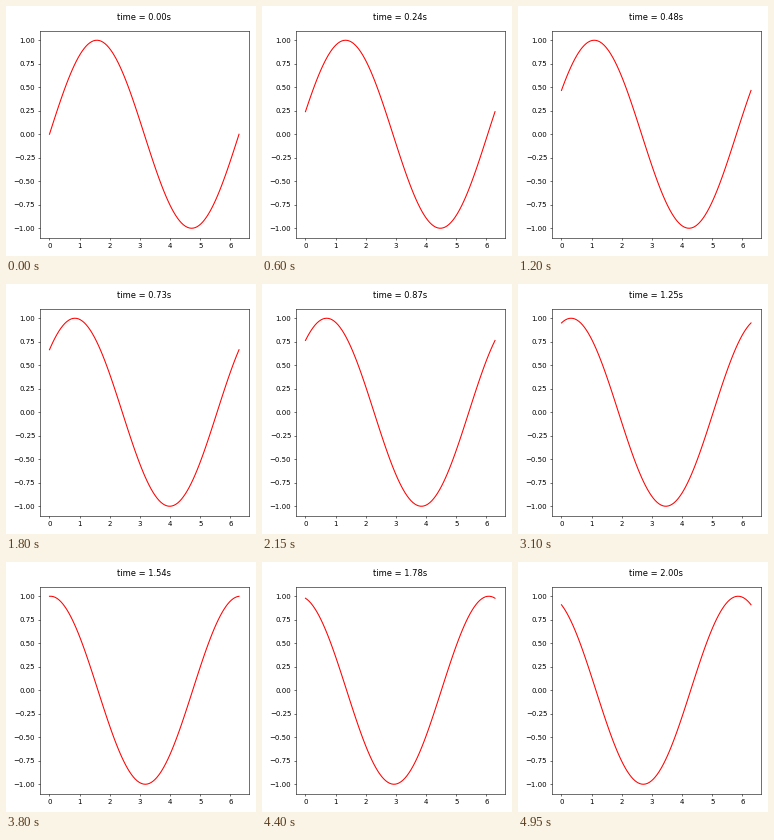
Animation, 250 px wide and 250 px high, one loop 5000 ms. Source, as a matplotlib script:

```python
import numpy as np
import matplotlib.pyplot as plt
from matplotlib.animation import FuncAnimation

FRAMES = 100
INTERVAL = 50  # ms

plt.rcParams["font.family"] = "DejaVu Sans"

x = np.linspace(0, 2 * np.pi, 100)
times = np.linspace(0, 2, FRAMES)

fig, ax = plt.subplots(figsize=(5, 5), dpi=50)
line, = ax.plot(x, np.sin(x), color="red")
title = ax.text(0.5, 1.05, "time = 0.00s", transform=ax.transAxes,
                ha="center", size=12)

# The title offset scales with the axes, so the layout needs a few passes.
for _ in range(3):
    fig.tight_layout()


def update(i):
    t = times[i]
    line.set_ydata(np.sin(x + t))
    title.set_text(f"time = {t:.2f}s")
    return line, title


anim = FuncAnimation(fig, update, frames=FRAMES, interval=INTERVAL,
                     repeat=True, repeat_delay=0)
plt.show()
```
